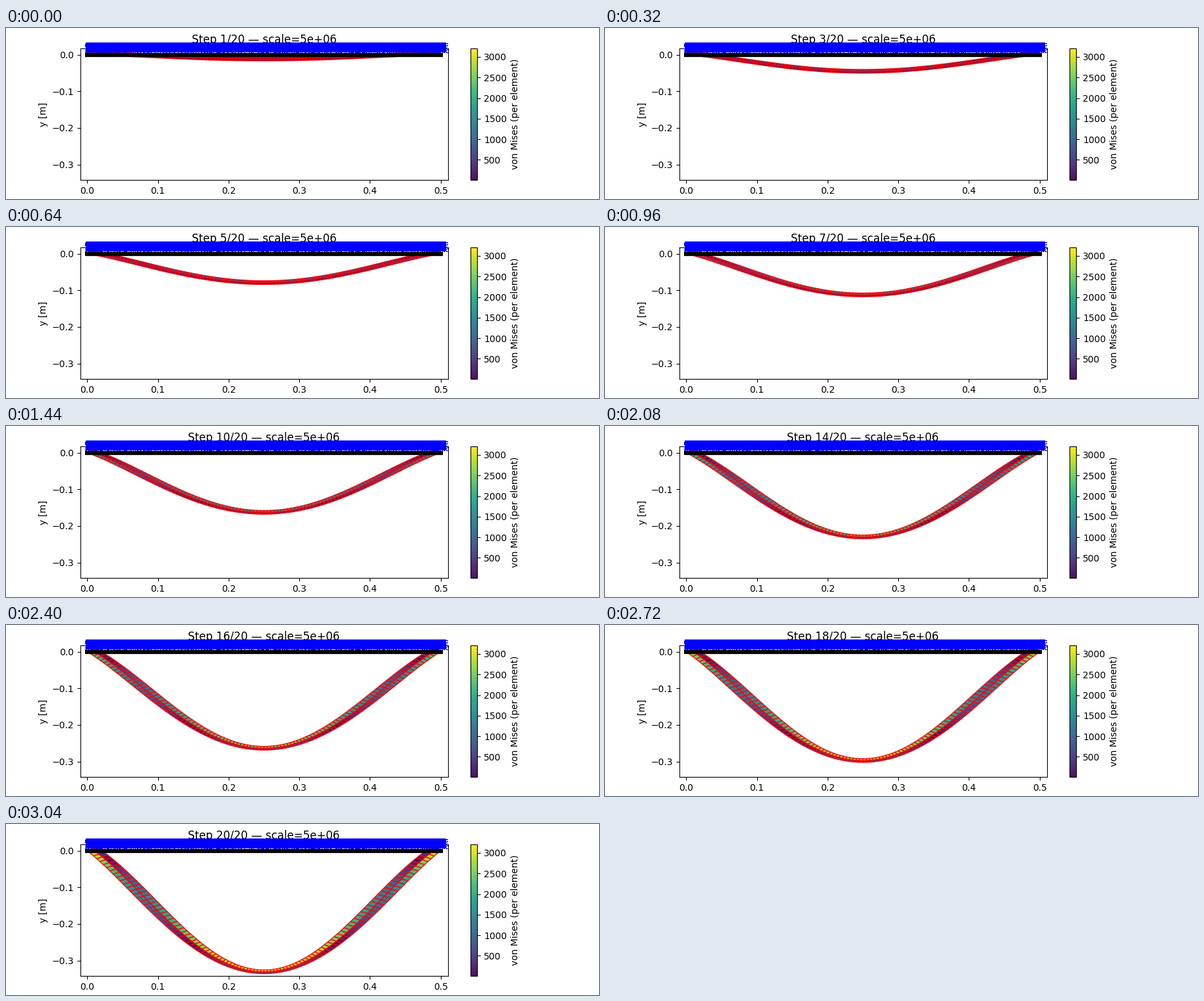
Recreate the animation shown at these times as a matplotlib script. Size 900 by 260 pixels, loop 3.2 s.

```python
import numpy as np
import matplotlib.pyplot as plt
from matplotlib.animation import FuncAnimation
from matplotlib.collections import PolyCollection
from matplotlib.patches import Rectangle
from matplotlib.transforms import Affine2D

WIDTH, HEIGHT, DPI = 900, 260, 100
STEPS, INTERVAL = 20, 160
LENGTH, DEPTH = 0.5, 0.01
SAG = 0.3358              # scaled mid-span deflection at full load
COLS, ROWS = 100, 2
STRESS_MIN, STRESS_MAX = 6, 3204

# Beam held at both bottom corners under uniform load
xi = np.linspace(0, 1, COLS + 1)
shape = 8 * xi**4 - 16 * xi**3 + 6 * xi**2 + 2 * xi
slope = (32 * xi**3 - 48 * xi**2 + 12 * xi + 2) / LENGTH
node_x = xi * LENGTH
node_y = np.linspace(0, DEPTH, ROWS + 1)

# Shortening of the midline keeps the bottom corners in place
axial = (DEPTH / 2) * slope[0] * (2 * xi - 1)


def element_stress():
    """Axial thrust plus bending at each element centre."""
    centre = (xi[:-1] + xi[1:]) / 2
    moment = 8 * centre * (1 - centre) - 1
    arm = ((np.arange(ROWS) + 0.5) / ROWS - 0.5) * 2
    thrust = STRESS_MAX / 2.5
    return np.abs(thrust * (1 + 3 * arm[:, None] * moment)).ravel()


def element_quads(load):
    """Corner points of every element at a fraction of the full load."""
    arm = node_y[:, None] - DEPTH / 2
    x = node_x + load * SAG * (arm * slope + axial * -1)
    y = node_y[:, None] - load * SAG * shape
    pts = np.stack([x, y], axis=-1)
    corners = [pts[:-1, :-1], pts[:-1, 1:], pts[1:, 1:], pts[1:, :-1]]
    return np.stack(corners, axis=2).reshape(-1, 4, 2)


def draw_load_band(ax, to_pixels):
    """Dense blue load symbols: a solid band with a ragged rim."""
    rng = np.random.default_rng(4)
    style = dict(color="blue", lw=0, transform=to_pixels, clip_on=False, zorder=4)
    ax.add_patch(Rectangle((121, 23), 547, 14, **style))
    ax.add_patch(Rectangle((121, 22), 547, 0.8, **style))
    rims = [
        (rng.integers(120, 671, 420), np.full(420, 37)),
        (rng.integers(668, 671, 26), rng.integers(23, 38, 26)),
        (np.full(9, 120), rng.integers(22, 38, 9)),
    ]
    for xs, ys in rims:
        for x, y in zip(xs, ys):
            ax.add_patch(Rectangle((x, y), 1, 1, **style))


fig, ax = plt.subplots(figsize=(WIDTH / DPI, HEIGHT / DPI), dpi=DPI)
to_pixels = Affine2D().scale(1 / WIDTH, -1 / HEIGHT).translate(0, 1) + fig.transFigure

stress = element_stress()
mesh = PolyCollection(element_quads(0), cmap="viridis", edgecolors="red",
                      linewidths=1.0, alpha=0.95)
mesh.set_array(stress)
mesh.set_clim(STRESS_MIN, STRESS_MAX)
ax.add_collection(mesh, autolim=False)
fig.colorbar(mesh, ax=ax, label="von Mises (per element)")

ax.plot(node_x, np.zeros_like(node_x), "ks", ms=4, mew=0, zorder=3)
ax.plot([0, LENGTH], [0, 0], color="black", lw=3.8, zorder=3)
draw_load_band(ax, to_pixels)

pad = 0.02 * (SAG + DEPTH)
ax.set_xlim(-0.01, LENGTH + 0.01)
ax.set_ylim(-SAG - pad, DEPTH + pad)
ax.set_ylabel("y [m]")
title = ax.set_title("")


def update(i):
    load = (i + 1) / STEPS
    mesh.set_verts(element_quads(load))
    mesh.set_array(stress * load)
    title.set_text(f"Step {i + 1}/{STEPS} — scale=5e+06")
    return mesh, title


anim = FuncAnimation(fig, update, frames=STEPS, interval=INTERVAL,
                     repeat=True, repeat_delay=0, blit=False)
plt.show()
```
